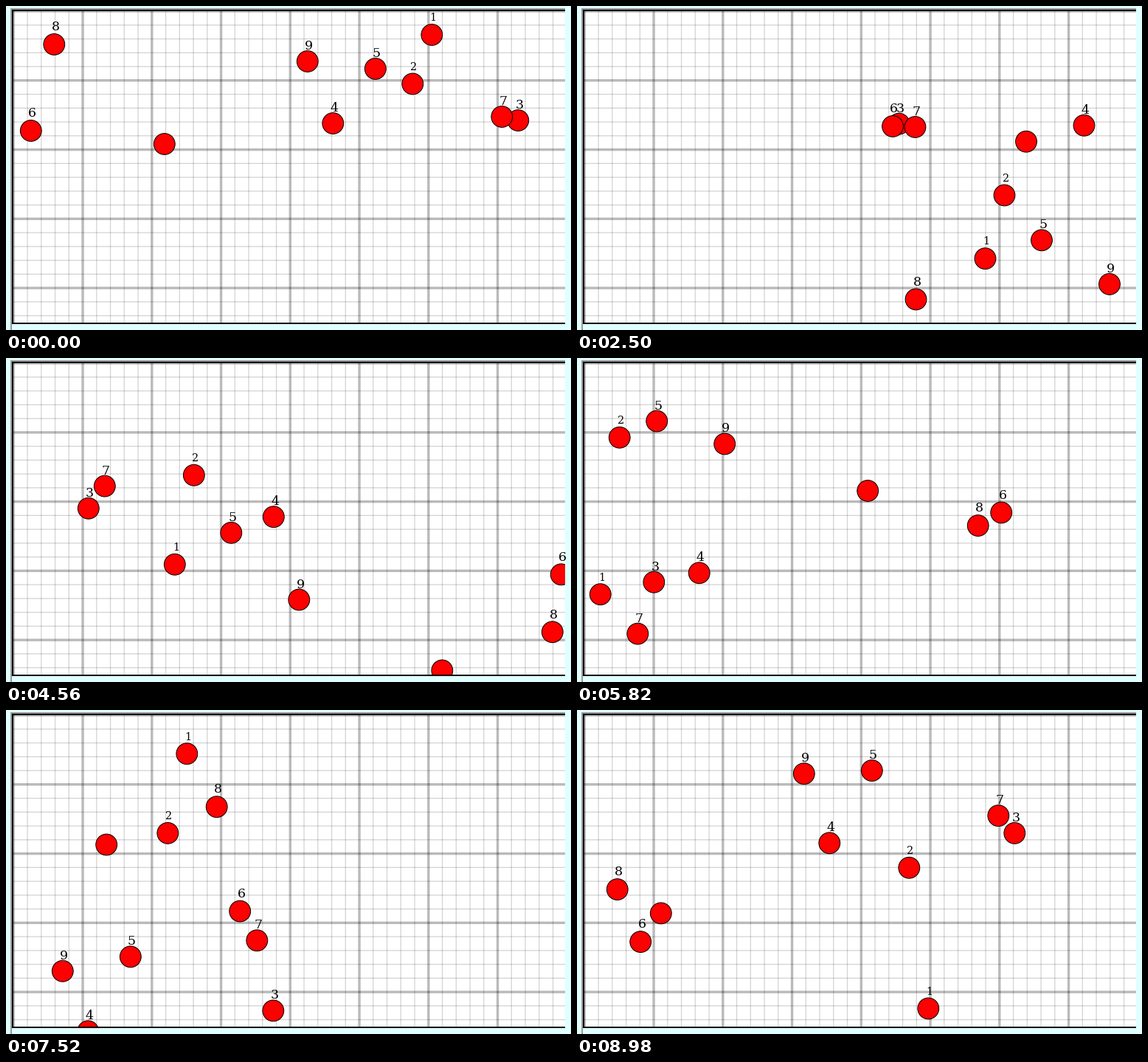
Animation of 766x439 px, one loop 9050 ms. Source, as a matplotlib script:

```python
import numpy as np
import matplotlib.pyplot as plt
from matplotlib.animation import FuncAnimation
from matplotlib.collections import LineCollection
from matplotlib.patches import Circle, Rectangle

W, H, DPI = 766, 439, 64
PT = 72 / DPI                      # points per pixel
LOOP, INTERVAL = 9050, 25
LEFT, TOP, RIGHT, BOTTOM = 10, 7, 758, 429
CELL = 93.75

# the picture advances in uneven steps, on a 20 ms clock
STARTS = 20 * np.floor((73.55 * np.arange(123) + 19) / 20)

# sideways travel, almost even, shared by all balls
KEY_STEPS = [0, 79, 102, 122]
KEY_DIST = [0, 916, 1174, 1405]

WALL_L, WALL_R = 9.2, 762.2        # turning points of a ball's centre
GRAVITY = 0.0585                   # fall = GRAVITY * travel ** 2
LEAD = 11                          # travel since the release

# label: start x, start y, travel between two highest points
BALLS = {
    "": (214.5, 187, 132.4),
    "1": (577, 39, 166.2),
    "2": (551, 105.5, 152.4),
    "3": (694, 155, 139.8),
    "4": (443, 159, 139.4),
    "5": (500.5, 85, 156.4),
    "6": (33.5, 169, 136.5),
    "7": (672, 150, 141.4),
    "8": (65, 52, 163.8),
    "9": (408.5, 75, 159.3),
}


def fold(x, lo, hi):
    """Reflect x back and forth between two walls."""
    w = hi - lo
    return lo + w - abs((x - lo) % (2 * w) - w)


class Ball:
    def __init__(self, label, x0, y0, period, z):
        self.x0, self.period = x0, period
        self.apex = y0 - GRAVITY * LEAD ** 2
        self.disc = Circle((0, 0), 14.4, fc="#ff0000", ec="black",
                           lw=1.0 * PT, zorder=z)
        ax.add_patch(self.disc)
        self.disc.set_clip_path(window)

        # old-style figures: 1 and 2 are short, some hang below the line
        short, hanging = label in "12", label in "34579"
        self.rise = 16 if hanging else 18.7
        self.text = ax.text(0, 0, label, family="DejaVu Serif",
                            size=(14.4 if short else 17.4) * PT,
                            ha="center", va="baseline", zorder=z + 0.5)
        self.text.set_clip_path(window)

    def place(self, travel):
        x = fold(self.x0 + travel, WALL_L, WALL_R) + 0.3
        half = self.period / 2
        fall = (travel + LEAD + half) % self.period - half
        y = self.apex + GRAVITY * fall ** 2
        self.disc.center = x, y
        self.text.set_position((x + 1.7, y - self.rise))


def grid(step, width, alpha, skip=0):
    """Lines every `step` pixels, leaving out each skip-th one."""
    for start, end, flip in ((LEFT + 0.3, RIGHT, False),
                             (TOP + 0.1, BOTTOM, True)):
        pos = [start + k * step for k in range(int((end - start) / step) + 1)
               if not skip or k % skip]
        segs = [[(LEFT, p), (RIGHT, p)] if flip else [(p, TOP), (p, BOTTOM)]
                for p in pos]
        lines = LineCollection(segs, colors=[(0, 0, 0, alpha)],
                               linewidths=width * PT, zorder=2,
                               capstyle="butt", snap=False)
        ax.add_collection(lines)


def bar(x0, y0, x1, y1, color):
    ax.add_patch(Rectangle((x0, y0), x1 - x0, y1 - y0, fc=color, lw=0,
                           zorder=50))


fig = plt.figure(figsize=(W / DPI, H / DPI), dpi=DPI, facecolor="#e0ffff")
ax = fig.add_axes([0, 0, 1, 1])
ax.set_xlim(0, W)
ax.set_ylim(H, 0)
ax.axis("off")

window = Rectangle((LEFT, TOP), RIGHT - LEFT, BOTTOM - TOP, fc="white", lw=0,
                   zorder=1)
ax.add_patch(window)
grid(CELL / 5, 1.3, 0.17, skip=5)
grid(CELL, 3.4, 0.27)

bar(6, 3, 8, H, "#9a9a9a")
bar(6, 3, RIGHT, 5, "#9a9a9a")
bar(8, 5, 10, 431, "black")
bar(8, 5, RIGHT, 7, "black")
bar(8, 429, RIGHT, 431, "black")

balls = [Ball(name, *spec, z=10 + i)
         for i, (name, spec) in enumerate(BALLS.items())]


def update(i):
    now = (i + 1) * INTERVAL - 1
    step = np.searchsorted(STARTS, now, side="right") - 1
    travel = np.interp(step, KEY_STEPS, KEY_DIST)
    for ball in balls:
        ball.place(travel)
    return []


anim = FuncAnimation(fig, update, frames=LOOP // INTERVAL, interval=INTERVAL,
                     init_func=lambda: update(0), repeat=True, repeat_delay=0,
                     blit=False)
plt.show()
```
